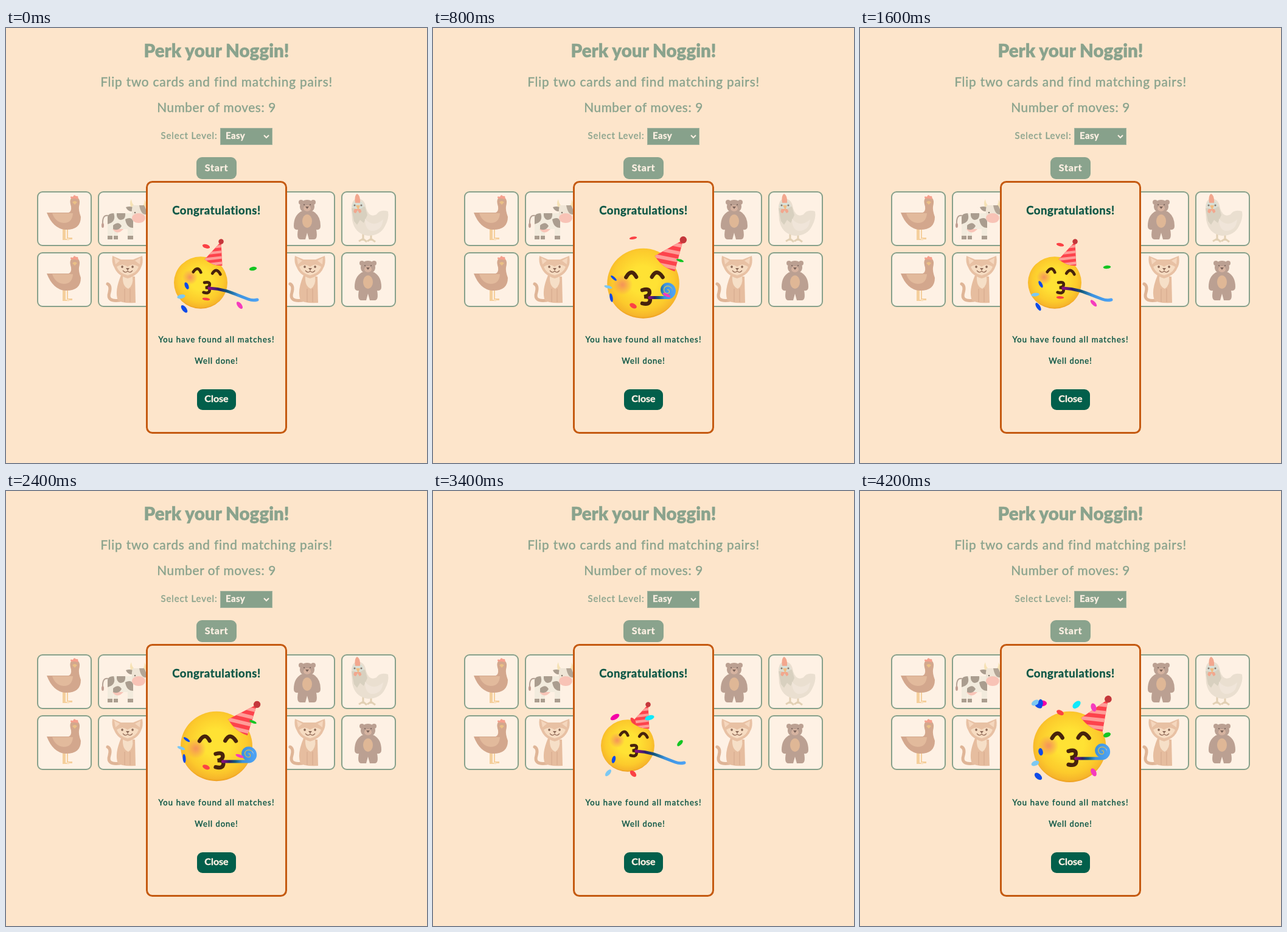
Recreate the animation shown at these times as an HTML page. Size 692x714 px, loop 4.4 s.

```html
<!DOCTYPE html>
<html lang="en">
<head>
<meta charset="utf-8">
<title>Memory game</title>
<style>
html, body { margin: 0; width: 100%; height: 100%; overflow: hidden; background: #fde5cb; }
svg { display: block; width: 692px; height: 714px; font-family: Lato, sans-serif; }
text { text-anchor: middle; fill: currentColor; stroke: currentColor; stroke-width: .4px; }
.soft { color: #8aa38d; fill: #8aa38d; }
.dark { color: #0d5746; }
.pale { color: #fef1e4; }
.b { font-weight: 700; }
.title { font-weight: 900; }
.card { fill: #fef1e4; stroke: #87a18b; stroke-width: 2; }
</style>
</head>
<body>
<svg viewBox="0 0 692 714">
  <defs>
    <radialGradient id="skin" cx=".5" cy=".45" r=".56">
      <stop offset=".35" stop-color="#ffe234"/><stop offset=".75" stop-color="#fcca2c"/>
      <stop offset=".93" stop-color="#f6b52b"/><stop offset="1" stop-color="#e9931a"/>
    </radialGradient>
    <radialGradient id="blush">
      <stop offset=".1" stop-color="#f5925a" stop-opacity=".9"/><stop offset="1" stop-color="#f5925a" stop-opacity="0"/>
    </radialGradient>
    <linearGradient id="paper">
      <stop offset="0" stop-color="#8d0f80"/><stop offset=".2" stop-color="#2b2168"/>
      <stop offset=".38" stop-color="#125a7c"/><stop offset=".6" stop-color="#3c92de"/><stop offset="1" stop-color="#4ea3f4"/>
    </linearGradient>
    <clipPath id="cone"><path id="coneShape" d="M0-50L-21 0Q0 8 21 0Z"/></clipPath>
    <g id="hat">
      <use href="#coneShape" fill="#fd434c"/>
      <path d="M-21-28l42-21M-21-14l42-21M-21 0l42-21M-21 14l42-21" clip-path="url(#cone)" stroke="#ff9d98" stroke-width="6"/>
      <circle cy="-50" r="5.8" fill="#c4373b"/>
    </g>
    <g id="features" fill="none" stroke="#47230c" stroke-width="6.5" stroke-linecap="round">
      <circle cx="-36" cy="17" r="17" fill="url(#blush)" stroke="none"/>
      <path d="M-30 4.5Q-21-11-13 4M13 4Q21-11 31 4.5"/>
      <path d="M-3 26Q10 22 9 31Q8 36 0 37Q11 36 10 43Q9 51-3 48"/>
    </g>

    <g id="goose">
      <path d="M42 60v20h11v-2h-6V60zM51 60v16h7v3h-9V60z" fill="#f5cf9c"/>
      <path d="M16 35H52Q57 33 56 25Q51 10 62 9Q73 10 69 25Q68 31 72 42Q72 64 46 63Q26 61 16 35z" fill="#d3a78d"/>
      <path d="M25 36H59Q58 52 44 52Q30 51 25 36z" fill="#e2ba9c"/>
      <path d="M56 12q-3-5 3-3q2-5 5-1q5-1 3 5q-6-2-11-1z" fill="#f5a08d"/>
      <path d="M58 18q4-4 8 0l-4 4z" fill="#e9bf85"/>
    </g>
    <g id="cow">
      <path d="M17 40Q7 38 8 54" fill="none" stroke="#b5a396" stroke-width="2"/>
      <ellipse cx="8" cy="56" rx="2" ry="4" fill="#c29f92"/>
      <path d="M16 42Q17 36 26 36H58V79H49V62H33V79H26V64L23 79H16z" fill="#f2ebdd"/>
      <path d="M24 62q8 11 18 0z" fill="#f8c4b7"/>
      <path d="M16 42q1-6 10-6q5 14-10 18zM31 36h14q1 11-8 11q-7-2-6-11zM25 56q9-8 14 1q-5 9-14 5zM45 46q10-5 13 3v11q-11 0-13-14zM16 73h8v6h-8zM26 73h7v6h-7zM49 73h9v6h-9z" fill="#aa9d8f"/>
      <path d="M55 27Q51 20 55 13Q56 22 61 24zM73 24Q78 20 76 13Q83 22 77 28z" fill="#f6e2b5"/>
      <path d="M46 26q9-3 13 2l-1 5q-9 1-12-7z" fill="#aa9d8f"/>
      <path d="M57 23H76Q81 39 74 51H61Q53 40 57 23z" fill="#efe5d6"/>
      <path d="M68 23h8q5 8 3 15q-8 1-11-15z" fill="#b3a596"/>
      <ellipse cx="67" cy="44" rx="11" ry="8" fill="#f8c3b6"/>
      <circle cx="61" cy="35" r="1.3" fill="#85786d"/>
    </g>
    <g id="bear" fill="#bba092">
      <circle cx="34" cy="18" r="4"/><circle cx="54" cy="18" r="4"/>
      <ellipse cx="44" cy="25" rx="12" ry="11"/>
      <path d="M34 33Q22 40 22 57Q22 64 29 63Q26 79 33 79H41L44 68L47 79H55Q62 79 59 63Q66 64 66 57Q66 40 54 33z"/>
      <ellipse cx="44" cy="49" rx="8" ry="11" fill="#dfb796"/>
      <ellipse cx="44" cy="28" rx="6" ry="5" fill="#d6b3a0"/>
      <path d="M41 25h6l-3 4zM39 21a1 1 0 1 0 .1 0zM49 21a1 1 0 1 0 .1 0z" fill="#796259"/>
    </g>
    <g id="hen">
      <path d="M36 68v13M49 68v13M29 82l7-4l6 5M43 82l6-4l7 5" fill="none" stroke="#e2d0b4" stroke-width="3"/>
      <path d="M17 31Q16 12 28 12Q39 13 41 28Q46 44 58 38Q64 29 77 33Q79 44 72 57Q64 73 44 73Q22 70 18 47z" fill="#eadfd0"/>
      <path d="M17 28L39 25L43 39L37 52L31 47L26 55L21 49z" fill="#d8d0bf"/>
      <path d="M39 45q14 16 30 1q-2 20-20 19q-10-3-10-20z" fill="#f0e5d9"/>
      <path d="M18 25q2-10 9-10q9 1 10 10q-9 9-19 0z" fill="#d9ded4"/>
      <path d="M23 19q-2-12 3-15q6 3 5 15zM22 29q-4 6 2 7l3-5l3 5q6-2 1-7z" fill="#f2a78e"/>
      <path d="M24 23h7l-3 8z" fill="#efbd83"/>
      <circle cx="22" cy="23" r="1.5" fill="#84786f"/><circle cx="33" cy="23" r="1.5" fill="#84786f"/>
    </g>
    <g id="cat">
      <path d="M36 79Q14 82 19 66Q22 55 16 52" fill="none" stroke="#dfb597" stroke-width="5" stroke-linecap="round"/>
      <path d="M38 38Q27 64 33 79Q38 84 62 83L61 40z" fill="#e6bd9f"/>
      <path d="M41 40Q40 56 50 60Q59 54 57 40z" fill="#f6dfc7"/>
      <path d="M44 60v22M53 60v22" stroke="#d4a78b"/>
      <path d="M24 6L38 12H58L73 6Q75 18 71 25Q66 38 49 43Q32 38 27 25Q22 17 24 6z" fill="#e8c1a4"/>
      <path d="M27 9L36 14L29 20zM70 9L61 14L69 20z" fill="#f5d7be"/>
      <path d="M31 24Q40 17 49 24Q57 17 67 24Q63 35 49 38Q35 35 31 24z" fill="#f6dcc2"/>
      <path d="M46 26h6l-3 4zM40 22a1.8 2 0 1 0 .1 0zM57 22a1.8 2 0 1 0 .1 0z" fill="#8d6b59"/>
      <path d="M41 30q4 5 8 1q4 4 8-1" fill="none" stroke="#9b7460" stroke-width="1.3"/>
    </g>
  </defs>

  <rect width="692" height="714" fill="#fde5cb"/>
  <g class="soft">
    <text x="346" y="48" font-size="29.5" class="title">Perk your Noggin!</text>
    <text x="346" y="96" font-size="20.8" letter-spacing=".8">Flip two cards and find matching pairs!</text>
    <text x="346" y="138" font-size="20.8" letter-spacing=".6">Number of moves: 9</text>
    <text x="301" y="182" font-size="15" letter-spacing=".9">Select Level:</text>
    <rect x="352.5" y="164.5" width="85" height="27" fill="#87a18b" stroke="#a5b4a0"/>
    <rect x="313" y="212" width="66" height="36" rx="9"/>
  </g>
  <path d="M424 176l4 4l4-4" fill="none" stroke="#fef1e4" stroke-width="2"/>
  <g class="pale b">
    <text x="377" y="182" font-size="15" letter-spacing=".4">Easy</text>
    <text x="346" y="235" font-size="16" letter-spacing=".8">Start</text>
  </g>
  <g id="cards"></g>
  <rect x="231.5" y="252.5" width="229" height="412" rx="9" fill="#fde5cb" stroke="#c55a11" stroke-width="3"/>
  <g class="dark">
    <text x="346" y="306" font-size="18.5" letter-spacing=".6" class="b">Congratulations!</text>
    <text x="346" y="516" font-size="13" letter-spacing="1.2">You have found all matches!</text>
    <text x="346" y="551" font-size="13" letter-spacing="1">Well done!</text>
  </g>
  <rect x="314" y="593" width="64" height="34" rx="9" fill="#025f4b"/>
  <text x="346" y="614" font-size="16" class="b pale">Close</text>
  <g id="emoji"></g>
</svg>
<script>
const byId = id => document.getElementById(id);
const LOOP = 4400, STEP = 200;
const CYCLE = 1622, SECOND_BURST = 710, START = 844;
const CONFETTI_TOP = 343, CONFETTI_BOTTOM = 471;

const rows = ['goose cow - - bear hen', 'goose cat - - cat bear'];
byId('cards').innerHTML = rows.map((row, j) => row.split(' ').map((name, i) =>
  name === '-' ? '' : `<g transform="translate(${51 + 100 * i} ${268 + 100 * j})">
    <rect class="card" x="1" y="1" width="88" height="88" rx="8"/><use href="#${name}"/></g>`).join('')).join('');

const wake = { x: 346, y: 419, r: 59, eyeX: 347.5, eyeY: 406, hatX: 381, hatY: 388, tilt: 40 };
const full = { x: 343.5, y: 420.5, r: 60.5, eyeX: 344.5, eyeY: 398, hatX: 381, hatY: 381, tilt: 28 };
const blow = { x: 320, y: 418, r: 44, eyeX: 330, eyeY: 399, hatX: 341, hatY: 385, tilt: 20 };

const flakes = [
  { x: 293, y: 439, speed: .165, tilt: 85, colour: '#0f4be8' },
  { x: 384, y: 435, speed: .15, tilt: 20, colour: '#f53bbd' },
  { x: 288, y: 422, speed: .14, tilt: 20, colour: '#7cc8f2' },
  { x: 329, y: 342, speed: .122, tilt: -15, colour: '#fb4145' },
  { x: 406, y: 379, speed: .12, tilt: 22, colour: '#14c522' },
  { x: 356, y: 317, speed: .19, tilt: -85, colour: '#0fe9fb' },
  { x: 299, y: 313, speed: .2, tilt: 40, colour: '#f500a6' },
  { x: 297, y: 408, speed: .113, tilt: 35, colour: '#0f4be8' }
];

const ramp = (from, to, v) => Math.min(1, Math.max(0, (v - from) / (to - from)));
const smooth = f => f * f * (3 - 2 * f);
const mix = (a, b, f) => Object.fromEntries(Object.keys(a).map(k => [k, a[k] + (b[k] - a[k]) * f]));

// Neighbouring flakes spin opposite ways; all flutter in step.
function confetti(age) {
  const flutter = Math.max(.55, Math.abs(Math.sin((age - 22) / 120)));
  return flakes.map((f, i) => {
    const y = f.y + f.speed * age;
    if (y < CONFETTI_TOP || y > CONFETTI_BOTTOM) return '';
    const size = 3.5 + f.speed * 23, angle = f.tilt + age * (i % 2 ? .24 : -.24);
    return `<ellipse rx="${size}" ry="${size * .62 * flutter}" fill="${f.colour}"
      transform="translate(${f.x} ${y}) rotate(${angle})"/>`;
  }).join('');
}

function blower({ eyeX, eyeY }, unrolled, p) {
  const recoil = 14 * Math.exp(-(((p - 25) / 15) ** 2));
  const path = unrolled > .5
    ? `M${eyeX + 4} ${eyeY + 28}c28 1 46 12 64 18q8 3 15 1`
    : `M${eyeX + 9} ${eyeY + 38}H${eyeX + 52 - recoil}a11 11 0 0 0 0-22a9 9 0 0 0 0 18a6 6 0 0 0 0-12a3 3 0 0 0 0 6`;
  return `<path d="${path}" fill="none" stroke="url(#paper)" stroke-width="5" stroke-linecap="round"/>`;
}

function draw(t) {
  const p = (t + START) % CYCLE;
  const lift = p < SECOND_BURST ? ramp(0, 400, p) ** .6 : 0;
  const unrolled = smooth(ramp(570, 620, p)) - smooth(ramp(1450, 1570, p));
  const pose = mix(mix(wake, full, lift), blow, unrolled);
  const { x, y, r, eyeX, eyeY, hatX, hatY, tilt } = pose, scale = r / 60;
  const bursts = [SECOND_BURST - CYCLE, 0, SECOND_BURST, CYCLE];
  byId('emoji').innerHTML = `<ellipse cx="${x}" cy="${y}" rx="${r}" ry="${r * .97}" fill="url(#skin)"/>
    <use href="#features" transform="translate(${eyeX} ${eyeY}) rotate(${5 * unrolled}) scale(${scale})"/>
    <use href="#hat" transform="translate(${hatX} ${hatY}) rotate(${tilt}) scale(${scale})"/>`
    + blower(pose, unrolled, p) + bursts.map(start => confetti(p - start)).join('');
}

function tick() {
  draw(Math.floor(performance.now() % LOOP / STEP) * STEP);
  requestAnimationFrame(tick);
}
tick();
</script>
</body>
</html>
```
